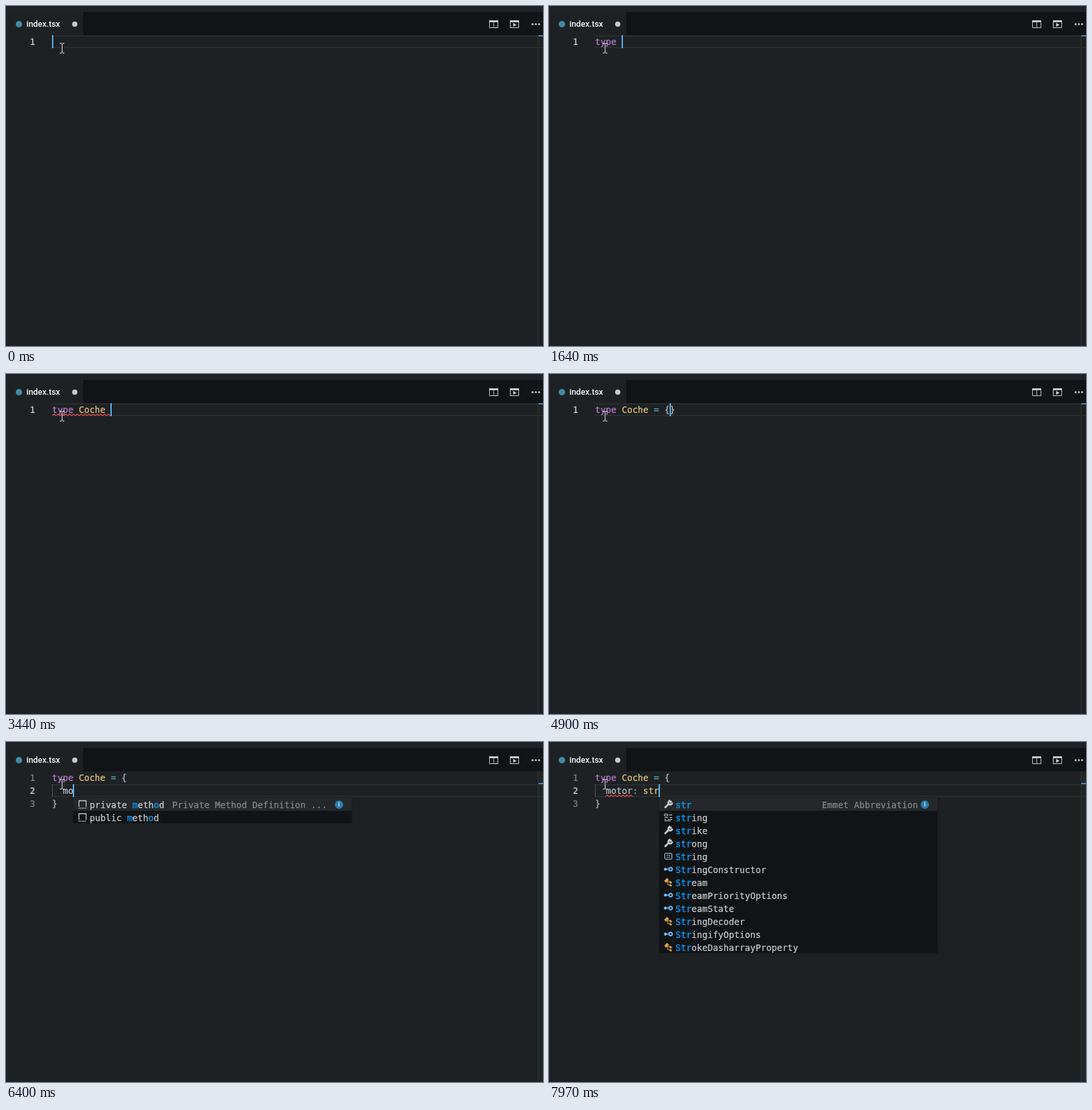
Write an HTML page that moves like this. It is 828x524 px and loops after 8 s.

```html
<!DOCTYPE html>
<html lang="es">
<head>
<meta charset="utf-8">
<title>Editor</title>
<style>
html, body { margin: 0; width: 100%; height: 100%; overflow: hidden; background: #1d2123; }
#stage { position: relative; width: 828px; height: 524px; overflow: hidden; background: #1d2123;
  font: 13.68px/20px "DejaVu Sans Mono", monospace; color: #b8bec6; -webkit-text-stroke: .2px; }
#stage div, #stage svg, .info { position: absolute; }
.line, .row { white-space: pre; height: 20px; }
.top { width: 828px; height: 9px; background: #1f2326; }
.tabs { top: 9px; width: 828px; height: 36px; background: #101416; }
.tab { top: 9px; width: 119px; height: 36px; background: #1d2123; }
.title { left: 31.5px; top: 18px; font: 500 13px/20px Roboto, sans-serif; letter-spacing: -.1px; color: #f4f5f6; -webkit-text-stroke: 0; }
.ruler { left: 820px; top: 45px; width: 1px; height: 479px; background: #303538; }
.strip { left: 821px; top: 45px; width: 7px; height: 479px; background: #1f2726; }
.mark { left: 821px; width: 7px; height: 2px; background: #4a8cb8; }
.current { left: 71px; width: 757px; height: 20px; box-sizing: border-box; border: solid #292d2f; border-width: 2px 0; }
.num { left: 0; width: 45px; text-align: right; color: #7d8386; }
.num.on { color: #d0d3d5; }
.line { left: 71px; }
.guide { left: 71px; top: 65px; width: 1px; height: 20px; background: #51585b; }
.caret { width: 2px; height: 20px; background: #5fb2f5; }
.kw { color: #bd7bd3; } .type { color: #e5c07b; } .op { color: #56a9b5; }
.popup { width: 429px; background: #101416; overflow: hidden; box-shadow: 0 0 3px #14181a; color: #c8ccce; }
.row { left: 0; width: 429px; }
.row.on { background: #25282b; }
.row span { position: absolute; left: 25px; top: 1px; }
.row b { font-weight: 400; color: #0a97f5; -webkit-text-stroke: .4px; }
.row .note { color: #868b8e; }
.row svg { left: 6px; top: 2px; }
.row .info { left: 403px; top: 4px; width: 13px; height: 13px; border-radius: 50%; background: #287ba7;
  font: 700 9px/13px "DejaVu Serif", serif; text-align: center; color: #b9dcec; -webkit-text-stroke: 0; }
.scroll { left: 418px; top: 0; width: 11px; height: 221px; background: #1e2225; }
</style>
</head>
<body>
<div id="stage">
  <div class="top"></div><div class="tabs"></div><div class="tab"></div>
  <div class="title">index.tsx</div>
  <svg width="828" height="45" fill="none" stroke="#c8cbcd">
    <g stroke="none"><circle cx="20" cy="28" r="5" fill="#438aa8"/>
      <g fill="#c8cbcd"><circle cx="106" cy="28" r="4"/><circle cx="812" cy="28" r="1.6"/><circle cx="817" cy="28" r="1.6"/><circle cx="822" cy="28" r="1.6"/>
      <path d="M745 22h14v3h-14zM777 22h14v3h-14zM782 26v6l5-3z"/></g></g>
    <path d="M745.5 22.5h13v11h-13zM752 23v11M777.5 22.5h13v11h-13z"/>
  </svg>
  <div id="editor"></div>
  <svg width="20" height="24" style="left:78px;top:53px" fill="none" stroke="#e4e6e7">
    <path d="M5 4.5h3M9 4.5h3M8.5 5v14M5 19.5h3M9 19.5h3"/>
  </svg>
</div>
<script>
const CHAR = 8.236, LEFT = 71, TOP = 45, ROW = 20, LOOP = 8000;

const icons = {
  key: '<path d="M2 3h5v3H2zM9 4.500h5M2 8.500h6M10 8.500h4M2 11.500h3M7 11.500h7M2 13.500h10" stroke="#c5c9cc"/>',
  module: '<path d="M8 1.500l5.500 3v7L8 14.500l-5.500-3v-7zM2.500 4.500L8 7.500l5.500-3M8 7.500v7" stroke="#b9a2ca" stroke-width="1.200"/>',
  braces: '<path d="M6 3q-2 0-2 2v1q0 2-1.500 2Q4 8 4 10v1q0 2 2 2M10 3q2 0 2 2v1q0 2 1.500 2Q12 8 12 10v1q0 2-2 2" stroke="#c5c9cc" stroke-width="1.300"/>',
  value: '<rect x="2.500" y="3.500" width="11" height="9" rx="1" stroke="#d0d4d6"/><path d="M5 6.500h6M5 9.500h6" stroke="#65b1ec"/>',
  bound: '<path d="M4 4H1.500v8H4M12 4h2.500v8H12" stroke="#d0d4d6"/><path d="M4.500 8L9 5l3 1.500v2L8 11 4.500 9.500z" fill="#69b5f2"/>',
  snippet: '<path d="M2.500 12V2.500h11V12" stroke="#c5c9cc" stroke-width="1.300"/><path d="M2 14h12" stroke="#c5c9cc" stroke-width="1.500" stroke-dasharray="1.500 1"/>',
  wrench: '<path d="M2.500 13.500l6-6" stroke="#c9cccf" stroke-width="3"/><path d="M13 3l-2.500 2.500M11 2.500a3 3 0 1 0 3 3" stroke="#c9cccf" stroke-width="2.800"/>',
  iface: '<circle cx="3.500" cy="8" r="2.300" fill="#75beff"/><path d="M5 8h4" stroke="#75beff" stroke-width="1.500"/><circle cx="11.500" cy="8" r="2.500" stroke="#75beff" stroke-width="1.800"/>',
  class: '<path d="M1.500 6L6 1.500 9 4.500 4.500 9zM11 6l3 2.500-2 2-3-2zM11 11l3 2-2 2-3-2z" fill="#e3a04a"/><path d="M6 7h5M7 7v5h3" stroke="#e3a04a"/>'
};

const typeRows = ['key typeof', 'module type', 'braces types', 'value TypeError', 'bound DocumentType',
  'bound MimeType', 'bound MimeTypeArray', 'bound SVGUnitTypes', 'value SSL_OP_SSLREF2_REUSE_CERT_TYPE_BUG',
  'module checkPropTypes', 'value elementType', 'value nominalTypeHack'];
const methodRows = ['snippet private method', 'snippet public method'];
const memberRows = [...methodRows, 'key module', 'value Map', 'iface MapConstructor', 'value Math', 'value MediaError',
  'value MediaList', 'value MessageChannel', 'value MessageEvent', 'value MimeType', 'value MouseEvent'];
const stringRows = ['wrench str', 'key string', 'wrench strike', 'wrench strong', 'value String', 'iface StringConstructor',
  'class Stream', 'iface StreamPriorityOptions', 'iface StreamState', 'class StringDecoder', 'iface StringifyOptions',
  'class StrokeDasharrayProperty'];

const typeList = (query, extra) => ({ rows: typeRows, query, right: 'typeof', scroll: true, ...extra });
const ctorList = query => ({ rows: ['snippet ctor'], query, note: 'Constructor (TypeScript Language)', info: true });
const body = text => ['type Coche = {', '  ' + text, '}'];

// Each step lists only what changes at that time.
const steps = [
  [0, { lines: [''], row: 0, col: null, caret: true, kw: false, named: false, err: null, popup: null }],
  [240, { lines: ['t'] }],
  [390, { popup: typeList('t') }],
  [480, { lines: ['ty'], popup: typeList('ty') }],
  [630, { lines: ['typ'], popup: typeList('typ') }],
  [870, { lines: ['type'] }],
  [940, { popup: typeList('typ', { selected: 1, right: '' }) }],
  [1250, { popup: typeList('typ', { selected: 1, right: '', info: true }) }],
  [1480, { lines: ['type '], kw: true, popup: null }],
  [1710, { err: [0, 0, 4] }],
  [2270, { lines: ['type C'], err: [0, 0, 5] }],
  [2340, { popup: { rows: ['snippet class', 'snippet ctor'], query: 'c', note: 'Class Definition (TypeScript Langua...', info: true } }],
  [2490, { lines: ['type Co'], popup: ctorList('co') }],
  [2650, { lines: ['type Coc'], popup: ctorList('coc') }],
  [2810, { lines: ['type Coch'], popup: null }],
  [3120, { lines: ['type Coche'] }],
  [3280, { named: true, err: [0, 0, 10] }],
  [3440, { lines: ['type Coche '], err: [0, 0, 11] }],
  [3900, { lines: ['type Coche ='] }],
  [4060, { lines: ['type Coche = '], err: null }],
  [4900, { lines: ['type Coche = {}'], col: 14 }],
  [5110, { lines: body(''), row: 1, col: null }],
  [5610, { caret: false }],
  [6000, { caret: true }],
  [6160, { lines: body('m') }],
  [6250, { popup: { rows: memberRows, query: 'm' } }],
  [6400, { lines: body('mo'), popup: { rows: methodRows, query: 'mo', note: 'Private Method Definition ...', info: true } }],
  [6470, { lines: body('mot'), popup: null }],
  [6620, { lines: body('moto') }],
  [6700, { lines: body('motor') }],
  [7090, { lines: body('motor:') }],
  [7250, { lines: body('motor: ') }],
  [7490, { lines: body('motor: s'), err: [1, 2, 7] }],
  [7650, { lines: body('motor: st'), popup: { rows: stringRows, query: 'st' } }],
  [7890, { lines: body('motor: str') }],
  [7970, { popup: { rows: stringRows, query: 'str', right: 'Emmet Abbreviation', info: true } }]
];
let last = {};
const states = steps.map(([time, change]) => last = { ...last, ...change, time });

const box = (cls, style, inner = '') => `<div class="${cls}" style="${style}">${inner}</div>`;
const span = (cls, text) => `<span class="${cls}">${text}</span>`;

function colour(line, s) {
  return line.replace(/^type(?= )|Coche|[=:]|(?<=: )\w+/g, word => {
    if (word === 'type') return s.kw ? span('kw', word) : word;
    if (word === 'Coche') return s.named ? span('type', word) : word;
    return span(/\w/.test(word) ? 'type' : 'op', word);
  });
}

function highlight(text, query) {
  const at = text.toLowerCase().indexOf(query);
  if (at >= 0) {
    const end = at + query.length;
    return `${text.slice(0, at)}<b>${text.slice(at, end)}</b>${text.slice(end)}`;
  }
  let i = 0;
  return [...text].map(c => c.toLowerCase() === query[i] ? (i++, `<b>${c}</b>`) : c).join('');
}

function squiggle([row, from, to]) {
  const width = (to - from) * CHAR;
  const wave = 'l3 -2.500l3 2.500'.repeat(Math.ceil(width / 6));
  return `<svg width="${width}" height="4" style="left:${LEFT + from * CHAR}px;top:${TOP + row * ROW + 16}px"><path d="M0 3.200${wave}" fill="none" stroke="#ee4a4e" stroke-width="1.200"/></svg>`;
}

function popup(p, x, y) {
  const selected = p.selected || 0;
  const rows = p.rows.map((item, i) => {
    const cut = item.indexOf(' '), text = item.slice(cut + 1), on = i === selected;
    let html = `<svg width="16" height="16" fill="none">${icons[item.slice(0, cut)]}</svg><span>${highlight(text, p.query)}</span>`;
    if (on && p.note) html += `<span class="note" style="left:${37 + text.length * CHAR}px">${p.note}</span>`;
    if (on && p.right) html += `<span class="note" style="left:auto;right:${p.info ? 30 : 11}px">${p.right}</span>`;
    if (on && p.info) html += '<i class="info">i</i>';
    return box(on ? 'row on' : 'row', `top:${i * ROW}px`, html);
  }).join('');
  const bar = p.scroll ? box('scroll', '') : '';
  return box('popup', `left:${x}px;top:${y}px;height:${p.rows.length * ROW - 1}px`, bar + rows);
}

function render(s) {
  const y = TOP + s.row * ROW;
  const x = LEFT + (s.col ?? s.lines[s.row].length) * CHAR;
  const several = s.lines.length > 1;
  let html = several ? box('strip', '') : '';
  html += box('ruler', '') + box('current', `top:${y}px`) + box('mark', `top:${several ? 63 : 45}px`);
  s.lines.forEach((line, i) => {
    const top = `top:${TOP + i * ROW}px`;
    html += box(i === s.row ? 'num on' : 'num', top, i + 1) + box('line', top, colour(line, s));
  });
  if (several) html += box('guide', '');
  if (s.err) html += squiggle(s.err);
  if (s.caret) html += box('caret', `left:${Math.floor(x)}px;top:${y}px`);
  if (s.popup) html += popup(s.popup, Math.round(x), y + ROW + 1);
  document.getElementById('editor').innerHTML = html;
}

let shown, start;
function frame(now) {
  start ??= now;
  const time = (now - start) % LOOP;
  const state = states.findLast(s => s.time <= time) || states[0];
  if (state !== shown) render(shown = state);
  requestAnimationFrame(frame);
}
render(shown = states[0]);
requestAnimationFrame(frame);
</script>
</body>
</html>
```
